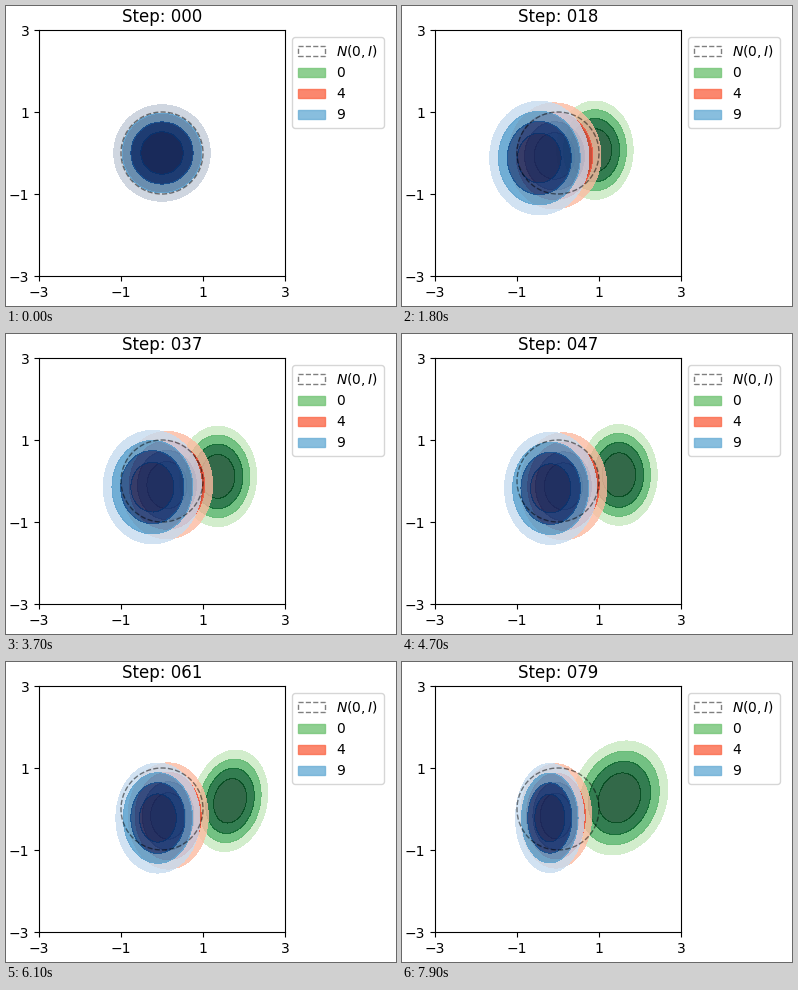
Animation, 390 px wide and 300 px high, one loop 8000 ms. Source, as a matplotlib script:

```python
import numpy as np
import matplotlib.pyplot as plt
from matplotlib.animation import FuncAnimation
from matplotlib.patches import Circle, Patch

STEPS = 80
ALPHA = 0.8
# Phases: pulled aside, spread apart, slow drift, settle
KEYS = (0, 9, 20, 61, 79)
START = (0, 0, 1, 1)

# Poses (mean x, mean y, std x, std y) reached at each key after the start
CLASSES = {
    "0": ("Greens", [(-0.22, 0.15, 0.66, 0.97), (1.15, 0.05, 0.82, 1.03),
                     (1.66, 0.20, 0.78, 1.05), (1.50, 0.27, 1.00, 1.18)]),
    "4": ("Reds", [(-0.92, -0.17, 0.65, 1.00), (0.10, -0.05, 1.03, 1.12),
                   (0.15, -0.17, 0.83, 1.10), (-0.05, -0.17, 0.74, 1.08)]),
    "9": ("Blues", [(-1.02, -0.22, 0.62, 1.07), (-0.33, -0.10, 1.12, 1.20),
                    (-0.10, -0.22, 0.87, 1.14), (-0.20, -0.22, 0.71, 1.13)]),
}

axis = np.linspace(-3, 3, 100)
X, Y = np.meshgrid(axis, axis)
levels = np.linspace(0.5, 1, 5)

fig = plt.figure(figsize=(3.9, 3.0), dpi=100, facecolor="white")
ax = fig.add_axes([33 / 390, 30 / 300, 246 / 390, 246 / 300])
ax.set(xlim=(-3, 3), ylim=(-3, 3), xticks=[-3, -1, 1, 3], yticks=[-3, -1, 1, 3])
title = ax.set_title("")

prior = Circle((0, 0), 1, fill=False, ec="black", ls="--", lw=1, alpha=0.5,
               zorder=2, label="$N(0, I)$")
ax.add_patch(prior)
handles = [prior] + [
    Patch(color=plt.get_cmap(cmap)(0.5), alpha=ALPHA, label=name)
    for name, (cmap, _) in CLASSES.items()
]
ax.legend(handles=handles, loc="upper left", bbox_to_anchor=(1, 1))


def pose(poses, step):
    return [np.interp(step, KEYS, values) for values in zip(START, *poses)]


def bell(mx, my, sx, sy, rho):
    """Gaussian density relative to its peak."""
    u, v = (X - mx) / sx, (Y - my) / sy
    return np.exp(-(u * u - 2 * rho * u * v + v * v) / (2 - 2 * rho ** 2))


layers = []


def update(step):
    while layers:
        layers.pop().remove()
    tilt = np.interp(step, (47, 61), (0, 0.15))
    for name, (cmap, poses) in CLASSES.items():
        z = bell(*pose(poses, step), tilt if name == "0" else 0)
        layers.append(ax.contourf(X, Y, z, levels, cmap=cmap, alpha=ALPHA,
                                  vmin=0.47, vmax=0.84))
    title.set_text(f"Step: {step:03d}")
    return [title]


anim = FuncAnimation(fig, update, frames=STEPS, interval=100,
                     repeat=True, repeat_delay=0, blit=False)
plt.show()
```
